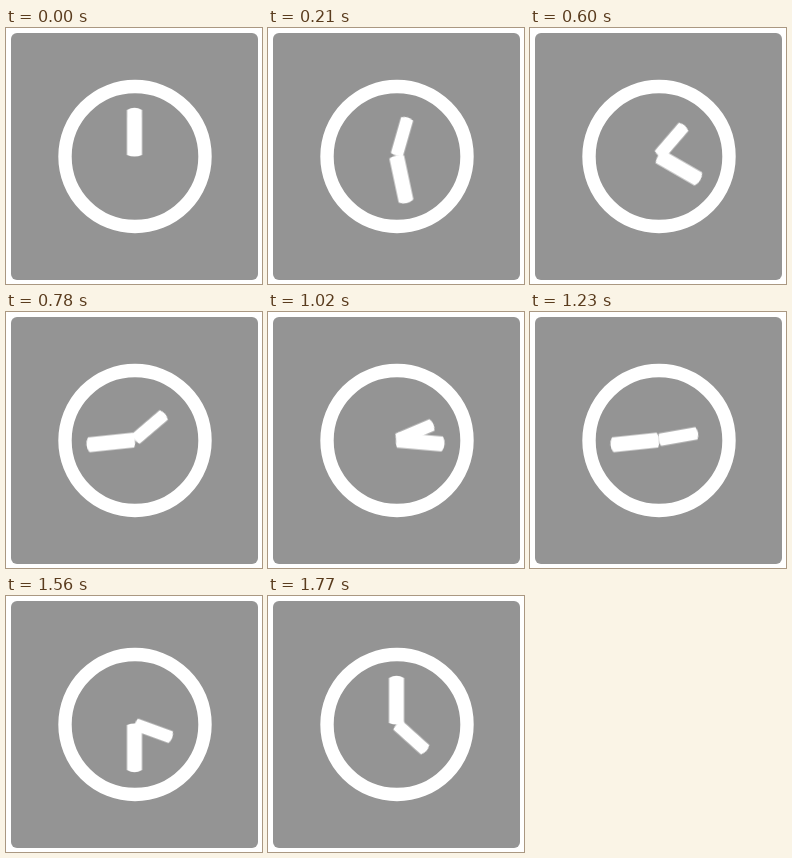
Write an HTML page that moves like this. It is 256 px wide and 256 px high and loops after 1.8 s.

```html
<!DOCTYPE html>
<html lang="en">
<head>
<meta charset="utf-8">
<title>Clock</title>
<style>
  html, body {
    margin: 0;
    width: 100%;
    height: 100%;
    overflow: hidden;
    background: #fff;
  }
  svg {
    display: block;
    width: 100vw;
    height: 100vh;
  }
  .hand {
    fill: #fff;
    animation: 1800ms infinite;
  }
  /* Both hands tick every 30 ms */
  .long { animation-name: long; }
  .short { animation-name: short; }

  @keyframes long {
    0% { transform: rotate(0deg); animation-timing-function: steps(14); }
    23.333% { transform: rotate(336deg); animation-timing-function: steps(12); }
    43.333% { transform: rotate(624deg); animation-timing-function: steps(8); }
    56.666% { transform: rotate(815deg); animation-timing-function: steps(7); }
    68.333% { transform: rotate(984deg); animation-timing-function: steps(11); }
    86.666% { transform: rotate(1260deg); animation-timing-function: steps(7); }
    98.333%, 100% { transform: rotate(1440deg); }
  }
  @keyframes short {
    0% { transform: rotate(0deg); animation-timing-function: steps(14); }
    23.333% { transform: rotate(32deg); animation-timing-function: steps(12); }
    43.333% { transform: rotate(49.5deg); animation-timing-function: steps(8); }
    56.666% { transform: rotate(67deg); animation-timing-function: steps(7); }
    68.333% { transform: rotate(80deg); animation-timing-function: steps(11); }
    86.666% { transform: rotate(110deg); animation-timing-function: steps(7); }
    98.333%, 100% { transform: rotate(132deg); }
  }
</style>
</head>
<body>
<svg viewBox="0 0 256 256">
  <rect x="5" y="5" width="247" height="247" rx="6" fill="#949494"/>
  <circle cx="129" cy="128.5" r="70" fill="none" stroke="#fff" stroke-width="13.4"/>
  <g transform="translate(128.5 128)">
    <path class="hand short" d="M-6.3-38.5Q0-42 6.3-38.5V-1.5Q0 1-6.3-1.5Z"/>
    <path class="hand long" d="M-7.5-46Q0-50.5 7.5-46V-1Q0 2-7.5-1Z"/>
  </g>
</svg>
</body>
</html>
```
